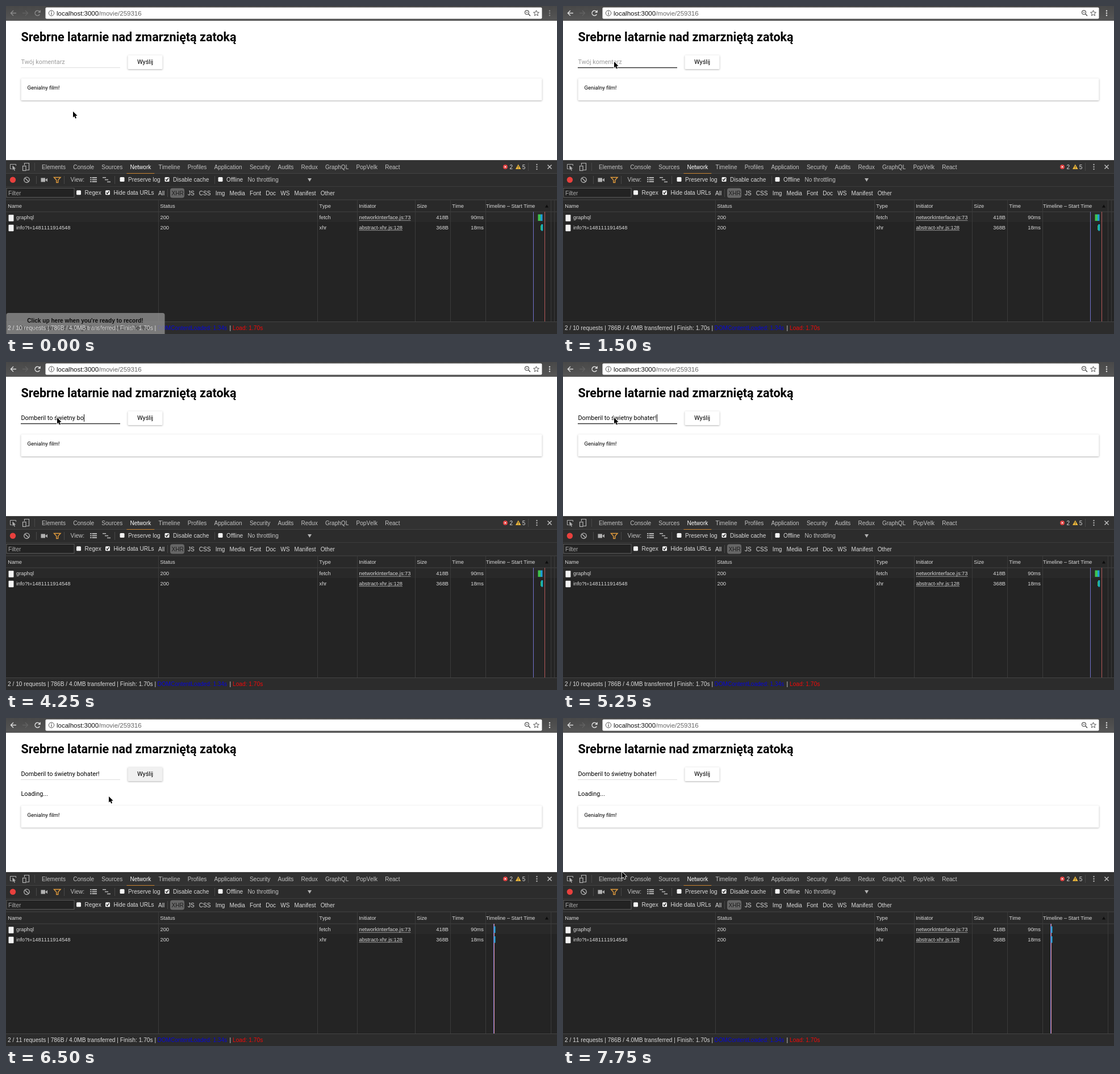
An HTML page with a canvas for the animation above (8000 ms loop, 970 by 577 pixels).

```html
<!DOCTYPE html>
<html lang="pl">
<head>
<meta charset="utf-8">
<title>Komentarze</title>
<style>
html, body { margin: 0; width: 100%; height: 100%; overflow: hidden; background: #fff; }
canvas { display: block; width: 970px; height: 577px; }
</style>
</head>
<body>
<canvas id="stage" width="970" height="577"></canvas>
<script>
const ctx = document.getElementById('stage').getContext('2d');
const LOOP = 8000, STEP = 250;
const CLICK = 6000, SENT = CLICK + STEP;
const UI = '"Liberation Sans", Arial, sans-serif';
const PAGE = 'Roboto, sans-serif';
const COMMENT = 'Domberil to świetny bohater!';
const LIGHT = '#dadada', ICON = '#b2b2b2', RULE = '#3b3b3b', EDGE = '#444';

// Pointer stops: time, x, y
const STOPS = [[0, 118, 185.5], [1000, 90, 98], [5250, 90, 98], [5750, 213, 78],
  [CLICK, 232, 90], [6500, 181, 138], [7750, 104, 271]];
const COLUMNS = { Name: 0, Status: 268, Type: 548, Initiator: 618, Size: 720, Time: 782 };

const clamp = (v, lo = 0, hi = 1) => Math.min(hi, Math.max(lo, v));

function pointerAt(t) {
  const next = STOPS.findIndex(stop => stop[0] > t);
  if (next < 0) return STOPS.at(-1).slice(1);
  const [t0, x0, y0] = STOPS[next - 1], [t1, x1, y1] = STOPS[next];
  const k = (t - t0) / (t1 - t0);
  return [x0 + (x1 - x0) * k, y0 + (y1 - y0) * k];
}
// Steady typing with one short pause
function typedCount(t) {
  const pause = clamp(t - 4250, 0, 250);
  return clamp(Math.round(7 + (t - pause - 2500) * 15 / 1750), 0, COMMENT.length);
}
const focusAt = t => clamp((t < CLICK ? t - 750 : 6225 - t) / 500);

function rect(x, y, w, h, color) {
  ctx.fillStyle = color;
  ctx.fillRect(x, y, w, h);
}
function round(x, y, w, h, r, color) {
  ctx.fillStyle = color;
  ctx.beginPath();
  ctx.roundRect(x, y, w, h, r);
  ctx.fill();
}
function disc(x, y, r, color) {
  ctx.fillStyle = color;
  ctx.beginPath();
  ctx.arc(x, y, r, 0, 7);
  ctx.fill();
}
function ring(x, y, r, color, width = 1, from = 0, to = Math.PI * 2) {
  ctx.strokeStyle = color;
  ctx.lineWidth = width;
  ctx.beginPath();
  ctx.arc(x, y, r, from, to);
  ctx.stroke();
}
function path(points, close) {
  ctx.beginPath();
  for (let i = 0; i < points.length; i += 2) ctx.lineTo(points[i], points[i + 1]);
  if (close) ctx.closePath();
}
function line(points, color, width = 1, close = false) {
  path(points, close);
  ctx.strokeStyle = color;
  ctx.lineWidth = width;
  ctx.stroke();
}
function poly(points, color) {
  path(points, true);
  ctx.fillStyle = color;
  ctx.fill();
}
function text(str, x, y, color = LIGHT, size = 10.07, family = UI, weight = 400, align = 'left') {
  ctx.font = `${weight} ${size}px ${family}`;
  ctx.fontKerning = family === UI ? 'none' : 'auto';
  ctx.textAlign = align;
  ctx.fillStyle = color;
  ctx.fillText(str, x, y);
  return ctx.measureText(str).width;
}
function pageText(str, x, y, color = '#000', size = 10.85, weight = 400) {
  return text(str, x, y, color, size, PAGE, weight);
}
// Words set one after another with an even gap
function flow(words, x, y, gap, paint) {
  for (const word of words.split(' ')) x += paint(word, x, y) + gap;
}
function card(x, y, w, h, fill, depth = 1) {
  ctx.save();
  ctx.shadowColor = `rgba(0,0,0,${.24 + .06 * depth})`;
  ctx.shadowBlur = 2 + depth;
  ctx.shadowOffsetY = .4 + .5 * depth;
  round(x, y, w, h, 1.5, fill);
  ctx.restore();
}
function checkbox(label, x, y, on) {
  round(x, y - 8, 8, 8, 1.5, '#f4f4f4');
  if (on) line([x + 1.8, y - 4, x + 3.4, y - 2, x + 6.4, y - 6.4], '#222', 1.4);
  text(label, x + 14.6, y);
}
function cross(x, y, r, color, width) {
  for (const s of [-1, 1]) line([x - r, y - r * s, x + r, y + r * s], color, width);
}
function dots(x, y, color) {
  for (const d of [-4, 0, 4]) disc(x, y + d, 1.2, color);
}
function divider(x, y) {
  rect(x, y, 1, 14, '#484848');
}
function arrow(x, y, scale, fill, outline) {
  const shape = [0, 0, 0, 10.6, 2.4, 8.4, 4.2, 12.4, 6, 11.6, 4.3, 7.7, 7.6, 7.5]
    .map((v, i) => v * scale + (i % 2 ? y : x));
  if (outline) line(shape, outline, 1.6, true);
  poly(shape, fill);
}

function browserBar(focused) {
  const grad = ctx.createLinearGradient(0, 0, 0, 26);
  grad.addColorStop(0, '#484848');
  grad.addColorStop(1, '#565656');
  rect(0, 0, 970, 26, grad);
  const icon = focused ? '#e2e2e2' : '#8d8d8d', dark = '#555';
  for (const [x, dir, color] of [[8.5, 1, icon], [38.5, -1, '#626262']]) {
    line([x + 9.5 * dir, 12.5, x, 12.5], color, 1.4);
    line([x + 4.5 * dir, 8, x, 12.5, x + 4.5 * dir, 17], color, 1.4);
  }
  ring(55.5, 12.5, 4.4, icon, 1.4, .5, 5.5);
  poly([60.8, 7, 60.8, 11.7, 56, 11.7], icon);

  round(69.5, 2.5, 874, 20, 2, '#fff');
  ring(80, 12.5, 4.7, dark);
  rect(79.4, 11.5, 1.2, 4, dark);
  rect(79.4, 9.2, 1.2, 1.3, dark);
  const host = text('localhost:3000', 89, 16.5, '#111', 11.5);
  text('/movie/259316', 89 + host, 16.5, '#666', 11.5);
  ring(917, 11.3, 3.5, dark, 1.2);
  line([919.6, 14, 923, 17.4], dark, 1.5);
  line([915.4, 11.3, 918.6, 11.3], dark);
  const star = [];
  for (let i = 0; i < 10; i++) {
    const a = i * Math.PI / 5 - Math.PI / 2, r = i % 2 ? 2.3 : 5.2;
    star.push(933.5 + r * Math.cos(a), 12.8 + r * Math.sin(a));
  }
  line(star, dark, 1, true);
  dots(957, 12.5, icon);
}

function page(t) {
  const left = 26.5, base = 101.8;
  rect(0, 26, 970, 245, '#fff');
  pageText('Srebrne latarnie nad zmarzniętą zatoką', left, 62, '#000', 21.5, 700);

  const typed = COMMENT.slice(0, typedCount(t));
  const width = typed ? pageText(typed, left, base) : 0;
  if (!typed) pageText('Twój komentarz', left, base, '#9c9c9c');
  if (typed && t < CLICK) rect(Math.round(left + width), 92, 1, 13, '#111');
  rect(26, 108, 175, 1, '#dedede');
  const half = 87.5 * focusAt(t);
  rect(113.5 - half, 107.8, half * 2, 1.4, '#2b2b2b');

  const clicked = t === CLICK, pressed = t >= CLICK && t < 6750;
  card(214.5, 86.5, 61, 24.5, pressed ? '#f1f1f1' : '#fff', clicked ? 2.5 : 1);
  if (clicked) disc(231, 93, 6.5, '#d6d6d6');
  pageText('Wyślij', 231, base);

  const shift = t >= SENT ? 26.7 : 0;
  if (shift) pageText('Loading...', left, 137.3);
  card(left, 127.3 + shift, 917, 38.7, '#fff');
  pageText('Genialny film!', 37.5, 147.3 + shift, '#000', 9.5);
}

function tabBar() {
  rect(0, 271, 970, 24, '#323232');
  rect(0, 271, 970, 1, EDGE);
  rect(0, 294, 970, 1, EDGE);
  line([10, 286.5, 7.5, 286.5, 7.5, 278.5, 17.5, 278.5, 17.5, 281], ICON);
  arrow(11.5, 280.5, .75, ICON);
  line([32.5, 280, 32.5, 276.5, 40.5, 276.5, 40.5, 288.5, 36, 288.5], ICON, 1.2);
  ctx.strokeRect(29.5, 281.5, 5.5, 8);
  divider(50, 276);
  const tabs = 'Elements Console Sources Network Timeline Profiles Application Security Audits Redux GraphQL PopVelk React';
  flow(tabs, 63, 287, 13.2, (tab, x, y) => {
    const active = tab === 'Network';
    const width = text(tab, x, y, active ? '#fff' : '#c2c2c2');
    if (active) rect(x - 6, 294, width + 12, 1, '#c98534');
    return width;
  });
  disc(879, 283, 4, '#e04040');
  cross(879, 283, 1.6, '#fff');
  poly([901.8, 278.5, 906.6, 287, 897, 287], '#f0b93a');
  rect(901.3, 281.3, 1, 3, '#333');
  rect(901.3, 285, 1, 1, '#333');
  text('2', 886.5, 287);
  text('5', 908.8, 287);
  divider(919, 276);
  dots(934.5, 283, ICON);
  cross(957, 283, 3.5, '#c0c0c0', 1.4);
}

function toolbars() {
  rect(0, 295, 970, 46, '#2c2c2c');
  rect(0, 317, 970, 1, RULE);
  disc(12, 305.8, 5.2, '#e8403d');
  ring(36.5, 305.8, 4.7, ICON, 1.4);
  line([33.2, 302.5, 39.8, 309.1], ICON, 1.4);
  for (const x of [53, 102, 191, 367]) divider(x, 299);
  rect(61.5, 302.5, 7.5, 7, ICON);
  poly([69, 306, 73, 302.8, 73, 309.2], ICON);
  line([84.5, 301.5, 96, 301.5, 91.7, 306.2, 91.7, 310.5, 88.8, 310.5, 88.8, 306.2], '#e09a3c', 1.4, true);
  text('View:', 113.5, 309, '#c2c2c2');
  for (let i = 0; i < 3; i++) {
    rect(148, 301 + i * 3.5, 2.5, 2, ICON);
    rect(151.5, 301 + i * 3.5, 8.5, 2, ICON);
    rect(170 + i * 4, 301 + i * 3.8, 6, 1.6, ICON);
  }
  checkbox('Preserve log', 200.5, 309);
  checkbox('Disable cache', 279.5, 309, true);
  checkbox('Offline', 373.5, 309);
  text('No throttling', 425.5, 309, '#c2c2c2');
  poly([531, 303, 538, 303, 534.5, 309], ICON);

  rect(.5, 320, 120, 17, '#5a5a5a');
  rect(1.5, 321, 118, 15, '#232323');
  text('Filter', 4, 333, '#a9a9a9');
  checkbox('Regex', 124, 332.3);
  checkbox('Hide data URLs', 175, 332.3, true);
  text('All', 268, 332.5);
  divider(284, 322);
  round(289, 320.5, 25, 17, 4, '#666');
  text('XHR', 291.5, 332.5, '#1d1d1d');
  flow('JS CSS Img Media Font Doc WS Manifest Other', 320, 332.5, 8.1, (word, x, y) => text(word, x, y));
}

function requestRow(y, name, type, source, size, time) {
  const cell = (str, x, align) => text(str, x, y, LIGHT, 9.3, UI, 400, align);
  round(4.5, y - 8, 9, 11.5, 1, '#f2f2f2');
  cell(name, 18);
  cell('200', COLUMNS.Status + 3.5);
  cell(type, COLUMNS.Type + 3.5);
  const width = cell(source, COLUMNS.Initiator + 3.5);
  rect(COLUMNS.Initiator + 3.5, y + 1.5, width, .8, ICON);
  cell(size, 779, 'right');
  cell(time, 841, 'right');
}

function table(sent) {
  rect(0, 341, 970, 214, '#242424');
  rect(0, 341, 970, 21, '#292929');
  rect(0, 362.5, 970, 17.5, '#292929');
  for (const y of [340.5, 361.5]) rect(0, y, 970, 1, EDGE);
  for (const x of [...Object.values(COLUMNS).slice(1), 844, 959]) rect(x, 341, 1, 214, RULE);
  for (const [name, x] of Object.entries(COLUMNS)) text(name, x + 3.2, 355, LIGHT, 9.3);
  text('Timeline – Start Time', 845, 355, LIGHT, 9.1);
  poly([949, 354.5, 955, 354.5, 952, 349.5], '#0c0c0c');
  requestRow(375.3, 'graphql', 'fetch', 'networkInterface.js:73', '418B', '90ms');
  requestRow(392.8, 'info?t=1481111914548', 'xhr', 'abstract-xhr.js:128', '368B', '18ms');

  if (!sent) rect(965, 341, 1, 214, RULE);
  rect(sent ? 858 : 928, 362, 1, 193, '#7272cc');
  rect(sent ? 859 : 948, 362, 1, 193, sent ? '#d88a90' : '#b55a5a');
  if (sent) {
    for (const y of [366.5, 384]) rect(859.3, y, 2.2, 11.5, '#1aa9e2');
  } else {
    rect(936.5, 366.5, 4.5, 11.5, '#3fc24f');
    rect(941, 366.5, 3.5, 11.5, '#1c9fd6');
    rect(941, 386, 1.3, 8, '#3fc24f');
    rect(942.2, 384, 3, 11.5, '#17b3c4');
  }
}

function statusBar(sent, notice) {
  const y = 570.3, size = 10.2;
  rect(0, 555, 970, 22, '#2c2c2c');
  rect(0, 555, 970, 1, EDGE);
  text('DOMContentLoaded: 1.34s', 266.5, y, '#0707d8');
  if (notice) {
    round(.5, 540, 279, 42, 4, 'rgba(140,140,140,.82)');
    text('Click up here when you\'re ready to record!', 139.5, 556.5, '#0d0d0d', 10.1, UI, 700, 'center');
    text('You can move and change the size of your selection', 139.5, y, '#3a3a3a', 10.07, UI, 400, 'center');
  }
  text(`2 / ${sent ? 11 : 10} requests | 786B / 4.0MB transferred | Finish: 1.70s |`, 3, y, LIGHT, size);
  text('|', 393.5, y, LIGHT, size);
  text('Load: 1.70s', 399, y, '#f00a0a', size);
}

function draw(now) {
  const t = Math.floor(now % LOOP / STEP) * STEP;
  const sent = t >= SENT;
  browserBar(t >= 1000);
  page(t);
  tabBar();
  toolbars();
  table(sent);
  statusBar(sent, t < STEP);
  arrow(...pointerAt(t), 1, '#000', '#fff');
}

const start = performance.now();
function tick() {
  draw(performance.now() - start);
  requestAnimationFrame(tick);
}
tick();
</script>
</body>
</html>
```
